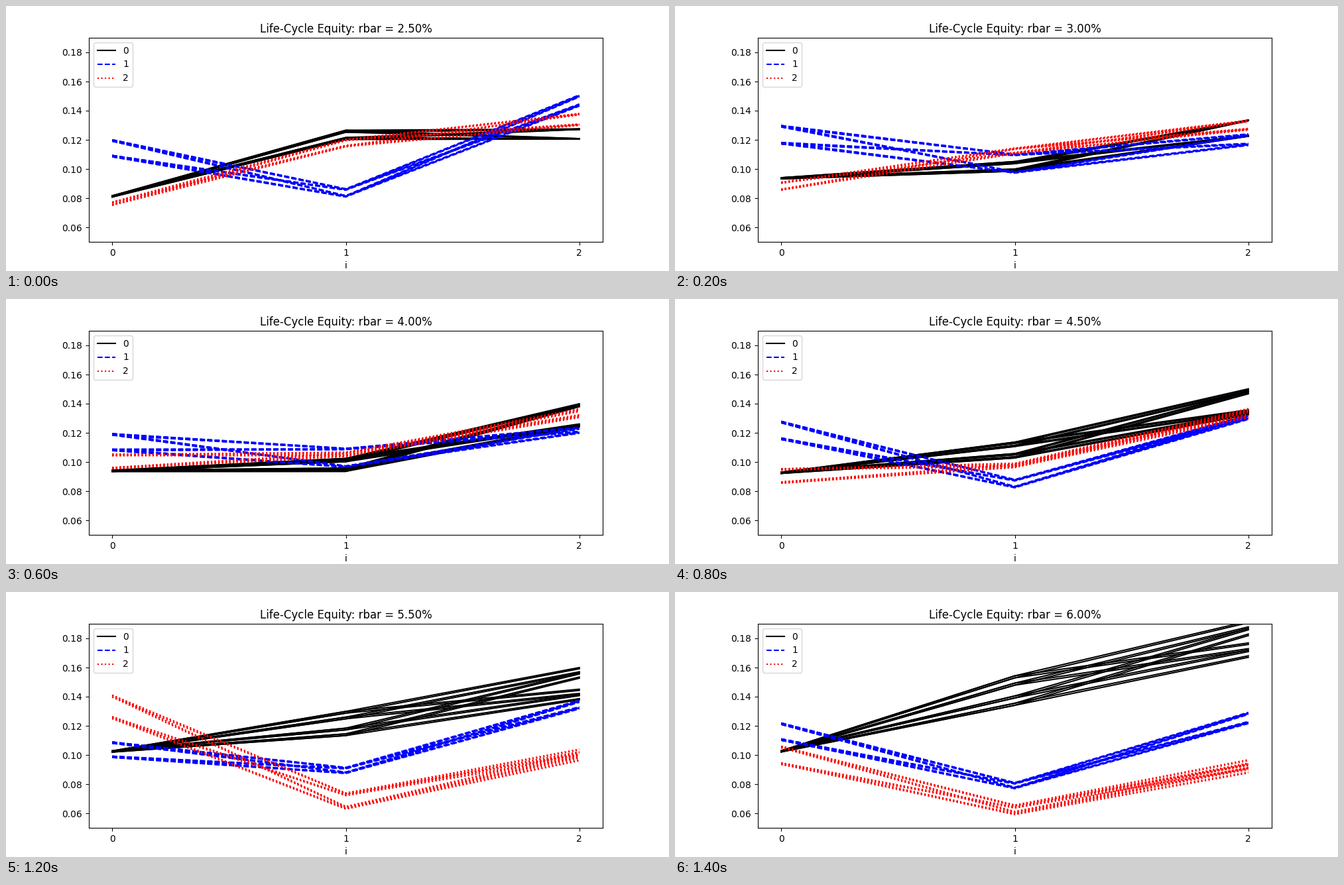
Animation of 1000 by 400 pixels, one loop 1600 ms. Source, as a matplotlib script:

```python
import itertools

import matplotlib.pyplot as plt
import numpy as np
from matplotlib.animation import FuncAnimation

N_FRAMES = 8
AGES = [0, 1, 2]
STYLES = [("black", "-"), ("blue", "--"), ("red", ":")]

# Mean equity (in thousandths) at ages 0, 1 and 2 for each type,
# at a few key steps.
KEYS = [0, 1, 3, 5, 6, 7]
MEANS = [
    [(81.2, 93.6, 93.9, 92.0, 102.4, 102.5),
     (123.4, 101.8, 98.0, 112.4, 121.6, 144.2),
     (124.0, 128.0, 132.0, 145.1, 148.9, 179.4)],
    [(114.2, 123.5, 113.6, 125.0, 103.6, 116.0),
     (83.6, 103.7, 102.9, 77.8, 89.4, 79.0),
     (147.0, 120.1, 121.8, 134.6, 134.6, 125.4)],
    [(76.2, 88.2, 100.3, 86.3, 133.0, 99.8),
     (117.8, 112.4, 105.2, 94.5, 68.4, 62.4),
     (134.0, 130.1, 133.5, 133.5, 100.0, 92.2)],
]

# Good or bad draws: one before birth, then one for each age.
SHOCKS = list(itertools.product([1, -1], repeat=4))


def ease_between(values, k):
    """Move from key to key, fast at first."""
    i = min(np.searchsorted(KEYS, k, side="right") - 1, len(KEYS) - 2)
    u = (k - KEYS[i]) / (KEYS[i + 1] - KEYS[i])
    return values[i] + (values[i + 1] - values[i]) * np.sqrt(u)


def spreads(kind, k, c0):
    """Effect of the current draw at each age, then of the last draw."""
    if kind == 0:
        now = (0.25, 2.5 + 0.09 * k**2, 3.3 + 4.2 * (1 - np.exp(-k / 1.5)))
        last = (0.4 + 0.043 * k**2, 0.05 * k**2)
    elif kind == 1:
        now = (0.047 * c0, 1.6 + 5 * np.exp(-((k - 2) / 1.7)**4),
               2.1 + 1.2 * np.cos(0.9 * (k - 0.6)))
        last = (0.2, 0.3)
    else:
        fade = np.exp(-k / 2)
        now = (0.06 * c0 * (1 - np.exp(-(k + 0.5) / 2.5)),
               0.6 + 1.5 * fade + 4.2 * np.exp(-1.5 * (k - 6.2)**2),
               1.6 + 2 * fade)
        last = (0.2 + 0.01 * k**2, 0.2 + 0.025 * k**2)
    return now, last


def paths(kind, k):
    """Equity at the three ages, one row for each shock history."""
    c0, c1, c2 = (ease_between(v, k) for v in MEANS[kind])
    (m0, m1, m2), (s1, s2) = spreads(kind, k, c0)
    a, b, c, d = np.transpose(SHOCKS)
    return np.column_stack([
        c0 + m0 * b + (0.06 * m0 + 0.15) * a,
        c1 + m1 * c + s1 * b + (0.2 * s1 + 0.2) * a,
        c2 + m2 * d + s2 * (c + 0.8 * b) + (0.15 * s2 + 0.15) * a,
    ]) / 1000


fig, ax = plt.subplots(figsize=(10, 4), dpi=100)
ax.set(xlim=(-0.1, 2.1), ylim=(0.05, 0.19), xlabel="i", xticks=AGES)
title = ax.set_title("")

groups = [
    [ax.plot(AGES, [0.1] * 3, color=color, ls=ls)[0] for _ in SHOCKS]
    for color, ls in STYLES
]
ax.legend([g[0] for g in groups], ["0", "1", "2"], loc="upper left")


def update(k):
    for kind, lines in enumerate(groups):
        for line, path in zip(lines, paths(kind, k)):
            line.set_ydata(path)
    title.set_text(f"Life-Cycle Equity: rbar = {2.5 + 0.5 * k:.2f}%")


anim = FuncAnimation(fig, update, frames=N_FRAMES, interval=200,
                     init_func=lambda: update(0), repeat=True, repeat_delay=0)
plt.show()
```
